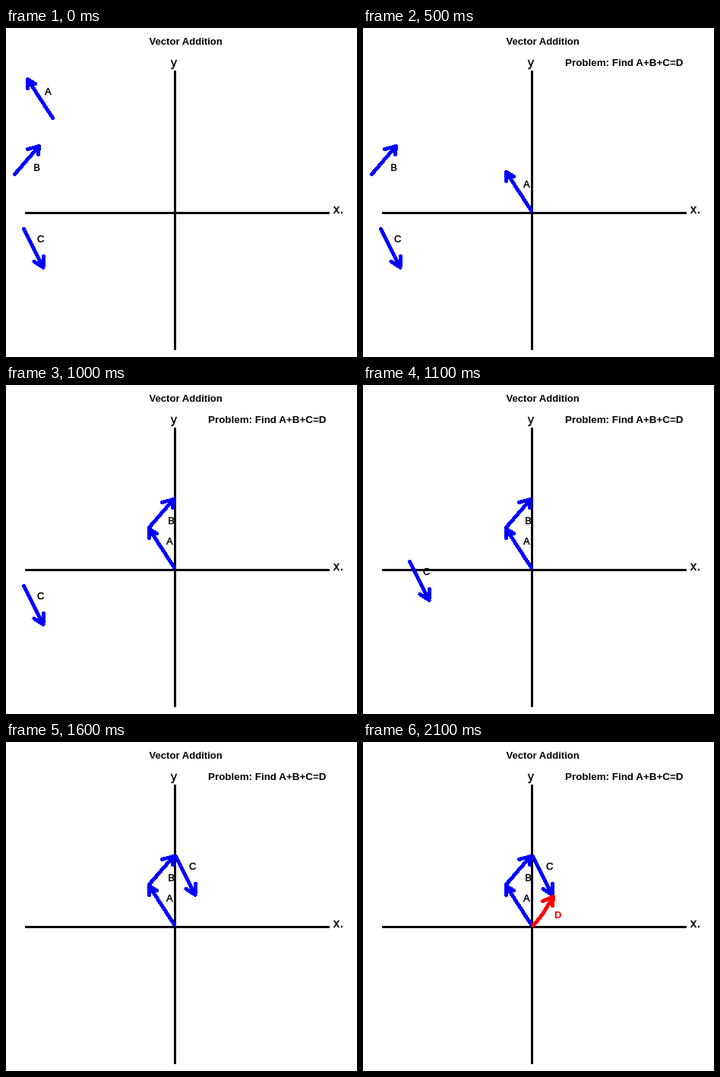
Recreate the animation shown at these times as an HTML page. Size 462 by 433 pixels, loop 7.1 s.

```html
<!DOCTYPE html>
<html lang="en">
<head>
<meta charset="utf-8">
<title>Vector Addition</title>
<style>
  html, body { margin: 0; width: 100%; height: 100%; overflow: hidden; background: #fff; }
  svg { display: block; }
  text { font: 13px "Liberation Sans", Arial, sans-serif; }
  .bold { font-weight: bold; }
  .axis { font: 15px "DejaVu Sans", Verdana, sans-serif; stroke: #000; stroke-width: .4; }
  .arrow path {
    fill: none; stroke-width: 5; stroke-linecap: round; stroke-linejoin: round;
    shape-rendering: crispEdges;
  }
  .blue path { stroke: #00f; }
  .blue text { stroke: #000; stroke-width: .45; }
</style>
</head>
<body>
<svg width="462" height="433" viewBox="0 0 462 433">
  <text class="bold" x="188.500" y="22" style="font-size:13.1px">Vector Addition</text>
  <text class="bold" id="problem" x="266" y="50" style="font-size:13.4px">Problem: Find A+B+C=D</text>
  <rect x="25" y="242" width="401" height="3" rx="1"/>
  <rect x="221" y="56" width="3" height="368" rx="1"/>
  <text class="axis" x="216.500" y="51">y</text>
  <text class="axis" x="430.500" y="244">x.</text>

  <g class="arrow blue" id="A">
    <path d="M61.500 118.500L28.500 67.500M28.500 79.500V67.500L38.500 73.500"/>
    <text x="51" y="88">A</text>
  </g>
  <g class="arrow blue" id="B">
    <path d="M11.500 192.500L43.500 155.500M28.500 159.500L43.500 155.500L42.500 166.500"/>
    <text x="36.200" y="188">B</text>
  </g>
  <g class="arrow blue" id="C">
    <path d="M23.500 264.500L49 315M37 307.500L49 315L49.500 300.500"/>
    <text x="41" y="282">C</text>
  </g>
  <g class="arrow" id="D">
    <path d="M223.500 241.500Q233 232 238 224L250.500 203.500M236.500 209.500L250.500 203.500L249.500 215.500"/>
    <text class="bold" x="252" y="232">D</text>
  </g>
</svg>
<script>
const STEP = 100, LAST = 21, LOOP = 7100;
const $ = id => document.getElementById(id);

// [step, dx, dy], linear between the entries
const moves = {
  A: [[1, 0, 0], [3, 71, 60], [5, 160, 122]],
  B: [[5, 0, 0], [7, 73, -18], [8, 108, -21], [10, 177, -5]],
  C: [[10, 0, 0], [13, 114, -97], [16, 200, -114]]
};
const flash = { 17: "#f00", 19: "#ff0", 21: "#f00" };

function offset(keys, step) {
  if (step <= keys[0][0]) return [0, 0];
  for (let i = 1; i < keys.length; i++) {
    const [s0, x0, y0] = keys[i - 1], [s1, x1, y1] = keys[i];
    if (step <= s1) {
      const p = (step - s0) / (s1 - s0);
      return [Math.round(x0 + (x1 - x0) * p), Math.round(y0 + (y1 - y0) * p)];
    }
  }
  return keys[keys.length - 1].slice(1);
}

const show = (id, on) => $(id).setAttribute("visibility", on ? "visible" : "hidden");

function draw(time) {
  const step = Math.min(LAST, Math.floor((time % LOOP) / STEP));
  show("problem", step >= 1);
  for (const id in moves)
    $(id).setAttribute("transform", `translate(${offset(moves[id], step)})`);
  const color = flash[step];
  show("D", color);
  if (color) {
    $("D").setAttribute("fill", color);
    $("D").firstElementChild.setAttribute("stroke", color);
  }
}

const start = performance.now();
function tick() {
  draw(performance.now() - start);
  requestAnimationFrame(tick);
}
tick();
</script>
</body>
</html>
```
